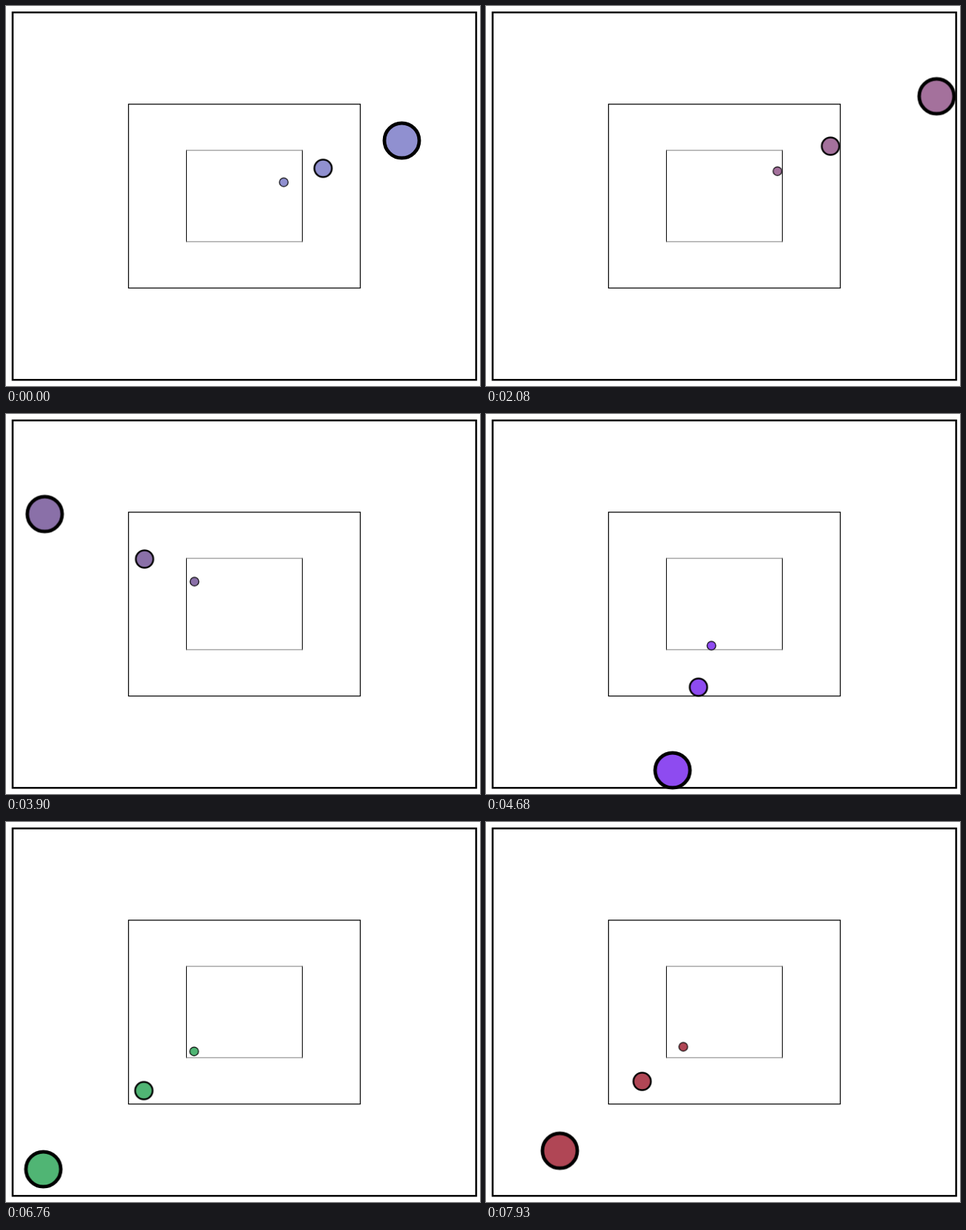
Write an HTML page that moves like this. It is 679 px wide and 545 px high and loops after 8 s.

```html
<!DOCTYPE html>
<html lang="en">
<head>
<meta charset="utf-8">
<title>Nested bouncing ball</title>
<style>
  html, body { margin: 0; width: 100%; height: 100%; overflow: hidden; background: #fff; }
  svg { display: block; width: 100%; height: 100%; }
  .frame { fill: none; stroke: #000; }
  .ball { stroke: #000; stroke-width: 5; animation: hop 8s step-end infinite; }

  /* one jump every 520 ms */
  @keyframes hop {
    0%    { transform: translate(567px, 193px);     fill: #9090d0; }
    6.5%  { transform: translate(146px, 400px);     fill: #a08a5c; }
    13%   { transform: translate(454.5px, 220.5px); fill: #8e284f; }
    19.5% { transform: translate(340.5px, 302.5px); fill: #6f9a8c; }
    26%   { transform: translate(645.5px, 129.5px); fill: #a4719c; }
    32.5% { transform: translate(462px, 235.5px);   fill: #7c8a5a; }
    39%   { transform: translate(409.8px, 498px);   fill: #68e23a; }
    45.5% { transform: translate(55.5px, 143.5px);  fill: #8a70a8; }
    52%   { transform: translate(151.5px, 182.5px); fill: #6d86b8; }
    58.5% { transform: translate(267.2px, 511px);   fill: #8e4bf0; }
    65%   { transform: translate(611.5px, 509.5px); fill: #7e9e7a; }
    71.5% { transform: translate(612px, 376px);     fill: #52be5c; }
    78%   { transform: translate(646px, 37px);      fill: #8f8078; }
    84.5% { transform: translate(53.5px, 498px);    fill: #50b574; }
    91%   { transform: translate(398.5px, 153.5px); fill: #94788c; }
    97.5%, 100% { transform: translate(105.8px, 471.5px); fill: #b04655; }
  }
</style>
</head>
<body>
<svg viewBox="0 0 679 545">
  <g class="frame">
    <rect x="9.5" y="9.2" width="664" height="527" stroke-width="2.6"/>
    <rect x="175.5" y="140.8" width="332" height="263.7" stroke-width="1.3"/>
    <path d="M258.5 206.5V338.5M424.5 206.5V338.5" stroke-width="1.1"/>
    <path d="M258 207H425M258 338H425" stroke="#777" stroke-width="1"/>
  </g>
  <circle class="ball" r="25"/>
  <g transform="translate(170.75 136.3) scale(.5)"><circle class="ball" r="25"/></g>
  <g transform="translate(256.125 204.45) scale(.25)"><circle class="ball" r="25"/></g>
</svg>
</body>
</html>
```
